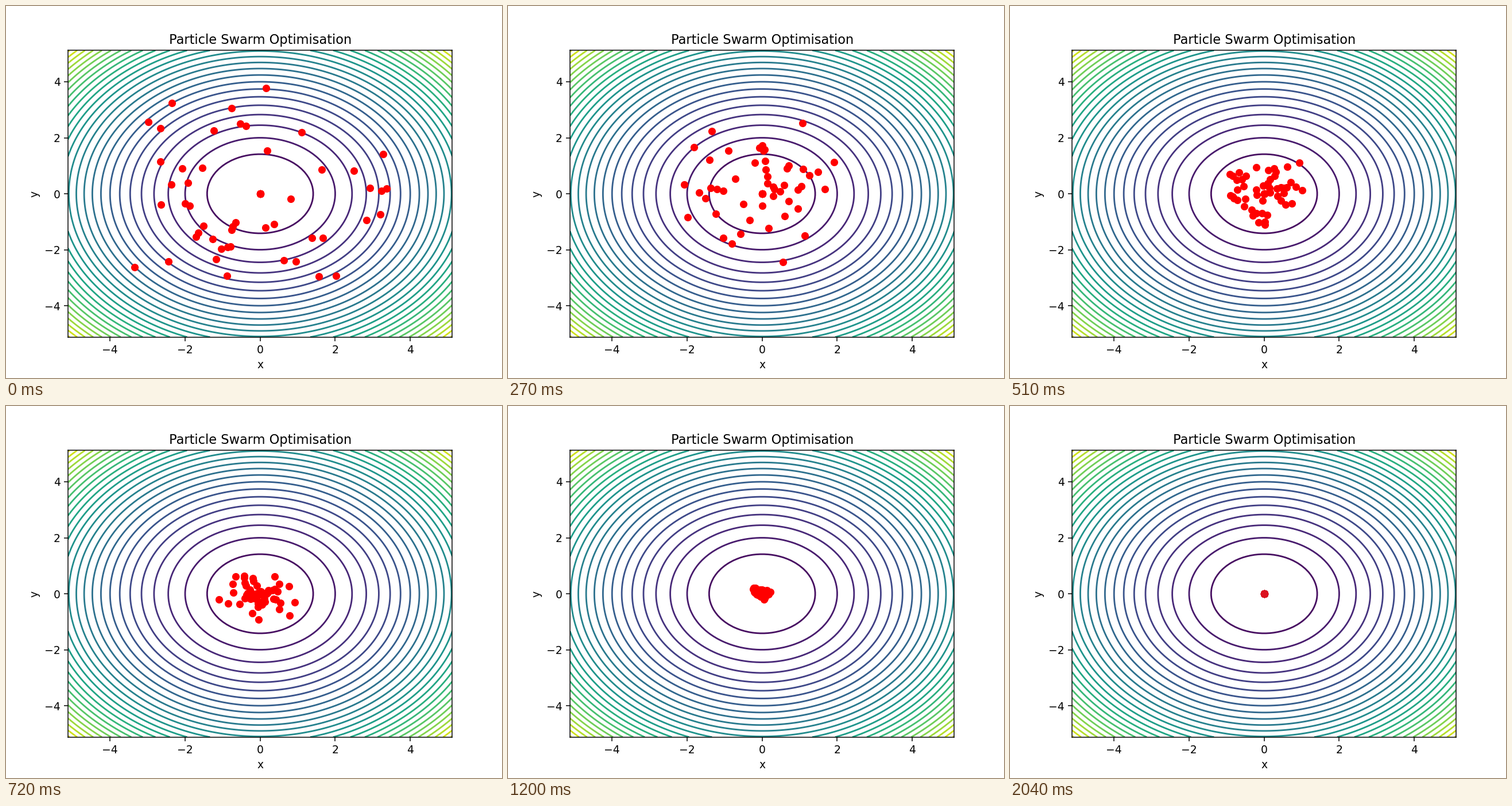
A matplotlib script for the animation above (3060 ms loop, 864 by 648 pixels).

```python
import numpy as np
import matplotlib.pyplot as plt
from matplotlib.animation import FuncAnimation

STEP_MS = 30
FRAMES = 102      # one loop of 3060 ms
LAST = 68         # the swarm rests from here on
COUNT = 49
BOUND = 5.12


def swarm_paths():
    """Shrinking oscillations about the optimum, shape (step, particle, 2)."""
    rng = np.random.default_rng(7)
    # The swarm starts as a loose ring, denser towards the lower left
    angle = rng.vonmises(-2.5, 0.5, COUNT)
    radius = np.clip(rng.normal(2.6, 1.0, COUNT), 0.4, 4.7)
    start = radius[:, None] * np.column_stack([np.cos(angle), np.sin(angle)])
    swing = rng.normal(0, 1.6, start.shape)
    omega = rng.uniform(0.5, 1.2, start.shape)
    rate = rng.normal(0.06, 0.008, (COUNT, 1))

    t = np.arange(LAST + 1)[:, None, None]
    spread = np.exp(-rate * t * (1 + (t / 60) ** 3))
    return spread * (start * np.cos(omega * t) + swing * np.sin(omega * t))


paths = swarm_paths()

fig, ax = plt.subplots(figsize=(6.4, 4.8), dpi=135)
fig.subplots_adjust(right=0.8998, top=0.8806)
axis = np.linspace(-BOUND, BOUND, 100)
X, Y = np.meshgrid(axis, axis)
ax.contour(X, Y, X**2 + Y**2, levels=np.arange(0, 55, 2), cmap="viridis")
ax.set(title="Particle Swarm Optimisation", xlabel="x", ylabel="y",
       xlim=(-BOUND, BOUND), ylim=(-BOUND, BOUND))

swarm, = ax.plot([], [], "ro", zorder=3)
# Stacked markers give the optimum its hard edge
best, = ax.plot(np.zeros(30), np.zeros(30), "ro", zorder=3)


def update(frame):
    step = min(frame, LAST)
    swarm.set_data(*paths[step].T)
    fade = np.clip((step - 45) / (LAST - 45), 0, 1)
    rgb = (1 - 0.14 * fade, 0.07 * fade, 0.12 * fade)
    swarm.set_color(rgb)
    best.set_color(rgb)
    return swarm, best


anim = FuncAnimation(fig, update, frames=FRAMES, interval=STEP_MS, repeat=True)
plt.show()
```
